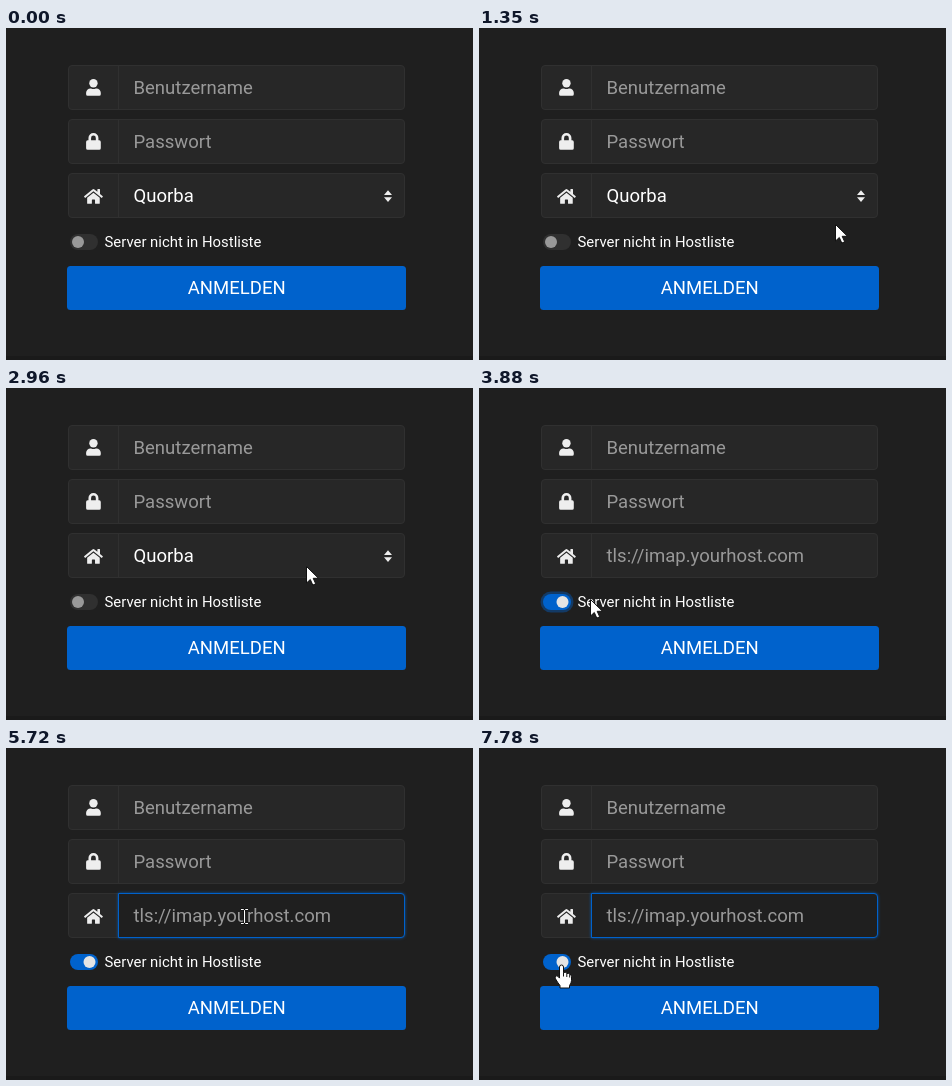
Animation of 467x332 px, one loop 8000 ms. Source, as an HTML page:

```html
<!DOCTYPE html>
<html lang="de">
<head>
<meta charset="utf-8">
<title>Anmelden</title>
<style>
  html, body { margin: 0; width: 100%; height: 100%; overflow: hidden; background: #1f1f1f; }
  svg { display: block; width: 467px; height: 332px; font: 18.55px Roboto, sans-serif; }
  .field { fill: #272727; stroke: #303030; }
  .divider { stroke: #303030; }
  .hint { fill: #999; }
  .bright { fill: #fff; }
  .icon { fill: #eee; }
  .label { font-size: 14.88px; }
  .options { font-size: 13px; font-weight: 500; fill: #e4e4e4; }
  .cursor { fill: #fff; stroke: #111; stroke-linejoin: round; }
  #hostFocus { fill: #1f1f1f; stroke: #0062cc; filter: drop-shadow(0 0 1.5px rgba(0, 98, 204, .8)); }
</style>
</head>
<body>
<svg viewBox="0 0 467 332">
  <defs>
    <g id="field">
      <rect class="field" x="62.5" y=".5" width="336" height="44" rx="3.5"/>
      <path class="divider" d="M112.5 1v43"/>
    </g>
  </defs>
  <rect width="467" height="332" fill="#1f1f1f"/>
  <rect y="328" width="467" height="4" fill="#1a1a1a"/>

  <use href="#field" y="37"/>
  <use href="#field" y="91"/>
  <use href="#field" y="145"/>

  <g class="icon">
    <g transform="translate(80.1 51) scale(.0328)">
      <circle cx="224" cy="128" r="128"/>
      <path d="M314 288H297Q224 320 151 288H134A134 134 0 0 0 0 422V464A48 48 0 0 0 48 512H400A48 48 0 0 0 448 464V422A134 134 0 0 0 314 288Z"/>
    </g>
    <path transform="translate(80.1 105) scale(.0328)" fill-rule="evenodd" d="M400 224H376V152A152 152 0 0 0 72 152V224H48A48 48 0 0 0 0 272V464A48 48 0 0 0 48 512H400A48 48 0 0 0 448 464V272A48 48 0 0 0 400 224ZM296 224H152V152A72 72 0 0 1 296 152Z"/>
    <g transform="translate(78 160) scale(.0328)">
      <path d="M288 142L96 300V464Q96 480 112 480H224Q240 480 240 464V368Q240 352 256 352H320Q336 352 336 368V464Q336 480 352 480H464Q480 480 480 464V300Z"/>
      <path d="M3 268L28 299Q36 305 45 301L288 101 531 301Q540 305 548 299L573 268Q576 258 572 251L488 183V44Q488 32 476 32H420Q408 32 408 44V117L318 43Q288 22 257 43L4 251Q0 258 3 268Z"/>
    </g>
  </g>

  <text class="hint" x="127.5" y="66">Benutzername</text>
  <text class="hint" x="127.5" y="120">Passwort</text>

  <g id="select">
    <text class="bright" x="127.5" y="174">Quorba</text>
    <path class="icon" d="M378 167L382 162.3 386 167ZM378 169.3L382 174 386 169.3Z"/>
  </g>
  <g id="host">
    <path id="hostFocus" d="M112.5 145.5H395Q398.5 145.5 398.5 149V186Q398.5 189.5 395 189.5H112.5Z"/>
    <text class="hint" x="127.5" y="174">tls://imap.yourhost.com</text>
  </g>

  <rect id="toggleFocus" x="61.5" y="203.5" width="33" height="21" rx="10.5" fill="#0062cc" opacity=".4"/>
  <rect id="track" x="64" y="206" width="28" height="16" rx="8"/>
  <circle id="knob" cy="214" r="6"/>
  <text class="bright label" x="98.5" y="219">Server nicht in Hostliste</text>

  <rect x="61" y="238" width="339" height="44" rx="3.5" fill="#0062cc"/>
  <text class="bright" x="230.7" y="266" text-anchor="middle">ANMELDEN</text>

  <g id="menu" class="options">
    <rect x="111.5" y="193.5" width="285" height="115" rx="2" fill="#191919" stroke="#2c2c2c"/>
    <path d="M112 232h284M112 270h284" stroke="#2b2b2b" stroke-width="2"/>
    <path d="M112 194.5v37" stroke="#0062cc" stroke-width="2"/>
    <path d="M119.8 211.8L124.7 216.5 134.3 207" fill="none" stroke="#fff" stroke-width="3.2"/>
    <text x="140" y="217">Quorba</text>
    <text x="140" y="255">VQK</text>
    <text x="140" y="293">Zurv.de</text>
  </g>

  <g id="pointer" class="cursor">
    <path id="arrow" d="M0 0V16.5L3.8 13 6.3 18.6 9.2 17.3 6.7 11.8H12Z"/>
    <g id="beam" fill="none">
      <path d="M-3.5 -7H-1L0 -6 1 -7H3.5M0 -6V6M-3.5 7H-1L0 6 1 7H3.5" stroke-width="2.6"/>
      <path d="M-3.5 -7H-1L0 -6 1 -7H3.5M0 -6V6M-3.5 7H-1L0 6 1 7H3.5" stroke="#fff"/>
    </g>
    <g id="hand">
      <path d="M-2 1.5Q-2 -.5 0 -.5T2 1.5V7Q4.5 6 5.3 8Q7.5 7.2 8.2 9Q10 8.5 10 11V15Q10 17.5 8 20V22.5H-1.5V20Q-4 17 -6 13.3Q-7.2 11 -5.3 10.4Q-4 10 -2 12.6Z"/>
      <path d="M2 7v4M5.3 8v3.5M8.2 9v3" fill="none"/>
    </g>
  </g>
</svg>
<script>
  const LOOP = 8000, FIRST = 200, STEP = 229.6;
  // Pointer stops: [step, x, y]
  const stops = [
    [4, 389, 224], [6, 356, 196], [8, 376, 164], [12, 376, 164], [15, 82, 217], [16, 82, 217],
    [17, 111, 211], [20, 111, 211], [22, 238, 168], [25, 238, 168], [29, 284, 183], [33, 82, 217], [35, 82, 217]
  ];
  const $ = id => document.getElementById(id);
  const show = (id, on) => $(id).style.display = on ? '' : 'none';

  function pointerAt(step) {
    const i = Math.max(1, stops.findIndex(stop => stop[0] >= step));
    const [s0, x0, y0] = stops[i - 1], [s1, x1, y1] = stops[i];
    const p = (step - s0) / (s1 - s0), ease = p * p * (3 - 2 * p);
    return [x0 + (x1 - x0) * ease, y0 + (y1 - y0) * ease];
  }

  function draw(time) {
    const step = time < FIRST ? 0 : 1 + Math.floor((time - FIRST) / STEP);
    const custom = step >= 16, hostFocused = step >= 23;
    show('select', !custom);
    show('host', custom);
    show('hostFocus', hostFocused);
    show('toggleFocus', custom && !hostFocused);
    show('menu', step >= 9 && step < 13);
    $('track').setAttribute('fill', custom ? '#0062cc' : '#303030');
    $('knob').setAttribute('fill', custom ? '#e4e4e4' : '#999');
    $('knob').setAttribute('cx', custom ? 83.5 : 72);

    const [x, y] = pointerAt(step);
    const overHost = custom && x > 112 && x < 399 && y > 145 && y < 190;
    const overToggle = x > 64 && x < 92 && y > 206 && y < 222;
    show('pointer', step >= 4);
    show('beam', overHost);
    show('hand', overToggle);
    show('arrow', !overHost && !overToggle);
    $('pointer').setAttribute('transform', `translate(${Math.round(x) + .5} ${Math.round(y) + .5})`);
  }

  function tick() {
    draw(performance.now() % LOOP);
    requestAnimationFrame(tick);
  }
  tick();
</script>
</body>
</html>
```
